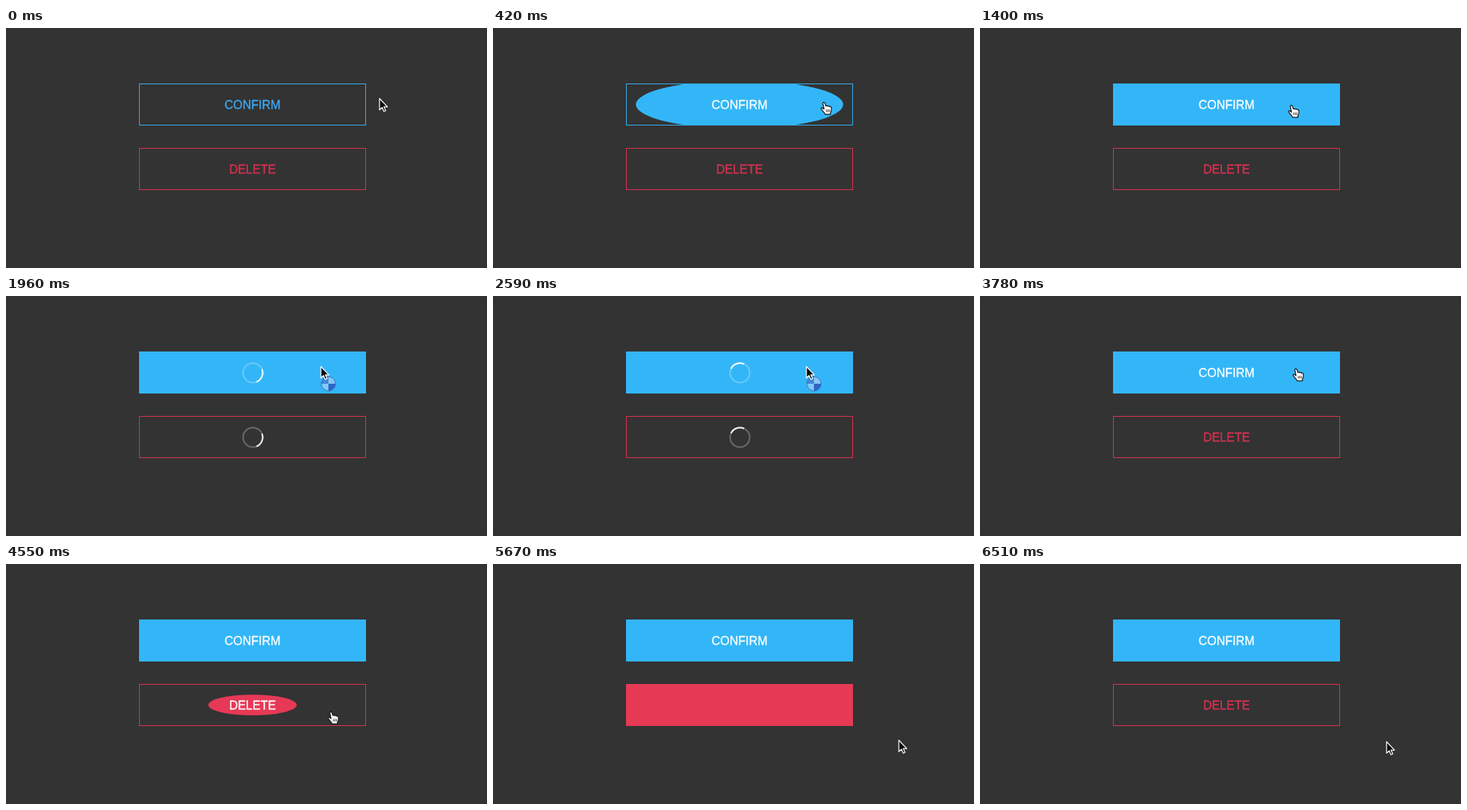
An HTML page with a canvas that plays this animation: 640 px wide and 320 px high, repeating every 6.58 s.

```html
<!DOCTYPE html>
<html lang="en">
<head>
<meta charset="utf-8">
<title>Button states</title>
<style>
  html, body { margin: 0; width: 100%; height: 100%; overflow: hidden; background: #333; }
  canvas { display: block; }
</style>
</head>
<body>
<canvas id="stage" width="640" height="320"></canvas>
<script>
const ctx = document.getElementById('stage').getContext('2d');
const LOOP = 6580, STEP = 70, FADE = 400;
const LOAD = [1470, 3500];
const BOX = { x: 177, w: 302, h: 56 };
const MID = BOX.x + BOX.w / 2;

const buttons = [
  { label: 'CONFIRM', y: 74, fill: '#33b6f7', line: '#35aeee', ink: '#3fa9f5', enter: 200, leave: Infinity },
  { label: 'DELETE', y: 160, fill: '#e63956', line: '#dc3150', ink: '#d9304f', enter: 4421, leave: 5560 }
];

// Pointer hot spot: time, x, y
const path = [
  [0, 497, 94], [210, 472, 96], [420, 440, 99], [700, 424, 92],
  [1190, 414, 103], [1400, 414, 103], [1680, 428, 96], [2030, 417, 94],
  [3430, 417, 94], [3570, 447, 57], [3780, 420, 97], [4060, 420, 97],
  [4340, 427, 150], [4410, 429, 172], [4550, 432, 197], [4760, 434, 199],
  [5110, 434, 199], [5250, 442, 201], [5320, 442, 201], [5530, 475, 212],
  [5600, 520, 228], [5670, 540, 235], [5950, 541, 237], [LOOP, 541, 237]
];

const arrowShape = new Path2D('M0 0V15.2L3.5 12L5.8 17.3L8.2 16.3L5.9 11.1H10.6Z');
const handShape = new Path2D(
  'M-1.2 1.2C-.6-.4 1.2-.2 1.7 1.2L3 5C4 4.2 5.2 4.5 5.6 5.3C6.6 4.7 7.7 5.1 8 6' +
  'C9.2 5.5 10.2 6.2 10.3 7.5C10.6 10 10.2 12 9 14V16.2H2.2C1 13.8-.6 12.4-2.2 10.4' +
  'C-3.4 9-3.8 8.2-3.2 7.6C-2.3 6.8-1 7.7.5 9.2Z');

const clamp = v => Math.min(1, Math.max(0, v));
const ease = v => v * v * (3 - 2 * v);
const within = (t, [from, to]) => t >= from && t < to;

function pointerAt(t) {
  const i = path.findIndex(p => p[0] > t);
  const [a, b] = [path[i - 1], path[i]];
  const k = (t - a[0]) / (b[0] - a[0]);
  return { x: Math.round(a[1] + (b[1] - a[1]) * k), y: Math.round(a[2] + (b[2] - a[2]) * k) };
}

function coverage(b, t) {
  return t < b.leave
    ? ease(clamp((t - b.enter) / FADE))
    : 1 - ease(clamp((t - b.leave) / FADE));
}

function drawSpinner(y, t) {
  const turn = (t - 2590) / 1000 * Math.PI * 2 - Math.PI * 0.61;
  const arc = (from, to, color) => {
    ctx.beginPath();
    ctx.arc(MID + 0.5, y + 0.5, 13, from, to);
    ctx.strokeStyle = color;
    ctx.stroke();
  };
  ctx.lineWidth = 2;
  arc(0, Math.PI * 2, 'rgba(255,255,255,.27)');
  arc(turn - Math.PI / 4, turn + Math.PI / 4, 'rgba(255,255,255,.92)');
}

function drawLabel(b, color) {
  ctx.font = '16px "Liberation Sans", Arial, sans-serif';
  ctx.textAlign = 'center';
  ctx.fillStyle = ctx.strokeStyle = color;
  ctx.lineWidth = 0.3;
  ctx.fillText(b.label, MID, b.y + 34);
  ctx.strokeText(b.label, MID, b.y + 34);
}

function drawButton(b, t) {
  const mid = b.y + BOX.h / 2;
  const p = coverage(b, t);
  if (p > 0.01) {
    ctx.save();
    ctx.beginPath();
    ctx.rect(BOX.x, b.y, BOX.w, BOX.h);
    ctx.clip();
    ctx.beginPath();
    ctx.ellipse(MID, mid, 240 * p, 56 * p, 0, 0, Math.PI * 2);
    ctx.fillStyle = b.fill;
    ctx.fill();
    ctx.restore();
  }
  ctx.lineWidth = 1;
  ctx.strokeStyle = p > 0.8 ? b.fill : b.line;
  ctx.strokeRect(BOX.x + 0.5, b.y + 0.5, BOX.w - 1, BOX.h - 1);

  if (within(t, LOAD)) drawSpinner(mid, t);
  else if (within(t, [b.enter, b.leave])) drawLabel(b, '#fff');
  else drawLabel(b, p > 0.01 ? b.fill : b.ink);
}

function drawBall() {
  ['#2f66c9', '#7fcaf6', '#4585d6', '#83c6f4'].forEach((color, i) => {
    ctx.beginPath();
    ctx.moveTo(10, 23);
    ctx.arc(10, 23, 9.5, i * Math.PI / 2, (i + 1) * Math.PI / 2);
    ctx.fillStyle = color;
    ctx.fill();
  });
  ctx.beginPath();
  ctx.arc(10, 23, 9.5, 0, Math.PI * 2);
  ctx.lineWidth = 1;
  ctx.strokeStyle = '#3a70b4';
  ctx.stroke();
}

function drawShape(shape, fill, line) {
  ctx.lineWidth = 1.2;
  ctx.lineJoin = 'round';
  ctx.fillStyle = fill;
  ctx.strokeStyle = line;
  ctx.fill(shape);
  ctx.stroke(shape);
}

function drawHand() {
  drawShape(handShape, '#fff', '#111');
  ctx.beginPath();
  for (const x of [3.6, 5.6, 7.6]) {
    ctx.moveTo(x, 9.5);
    ctx.lineTo(x, 13);
  }
  ctx.lineWidth = 0.8;
  ctx.stroke();
}

function drawPointer(t) {
  const { x, y } = pointerAt(t);
  const over = x >= BOX.x && x < BOX.x + BOX.w && buttons.some(b => y >= b.y && y < b.y + BOX.h);
  const busy = within(t, LOAD);
  ctx.save();
  ctx.translate(x, y);
  if (over && !busy) {
    drawHand();
  } else {
    if (busy) drawBall();
    drawShape(arrowShape, '#0a0a0a', '#fff');
  }
  ctx.restore();
}

function draw(t) {
  ctx.fillStyle = '#222';
  ctx.fillRect(0, 0, 640, 320);
  ctx.beginPath();
  ctx.roundRect(0, 0, 640, 320, 3);
  ctx.fillStyle = '#333';
  ctx.fill();
  buttons.forEach(b => drawButton(b, t));
  drawPointer(t);
}

const start = performance.now();
function tick() {
  const t = (performance.now() - start) % LOOP;
  draw(Math.floor(t / STEP) * STEP);
  requestAnimationFrame(tick);
}
tick();
</script>
</body>
</html>
```
